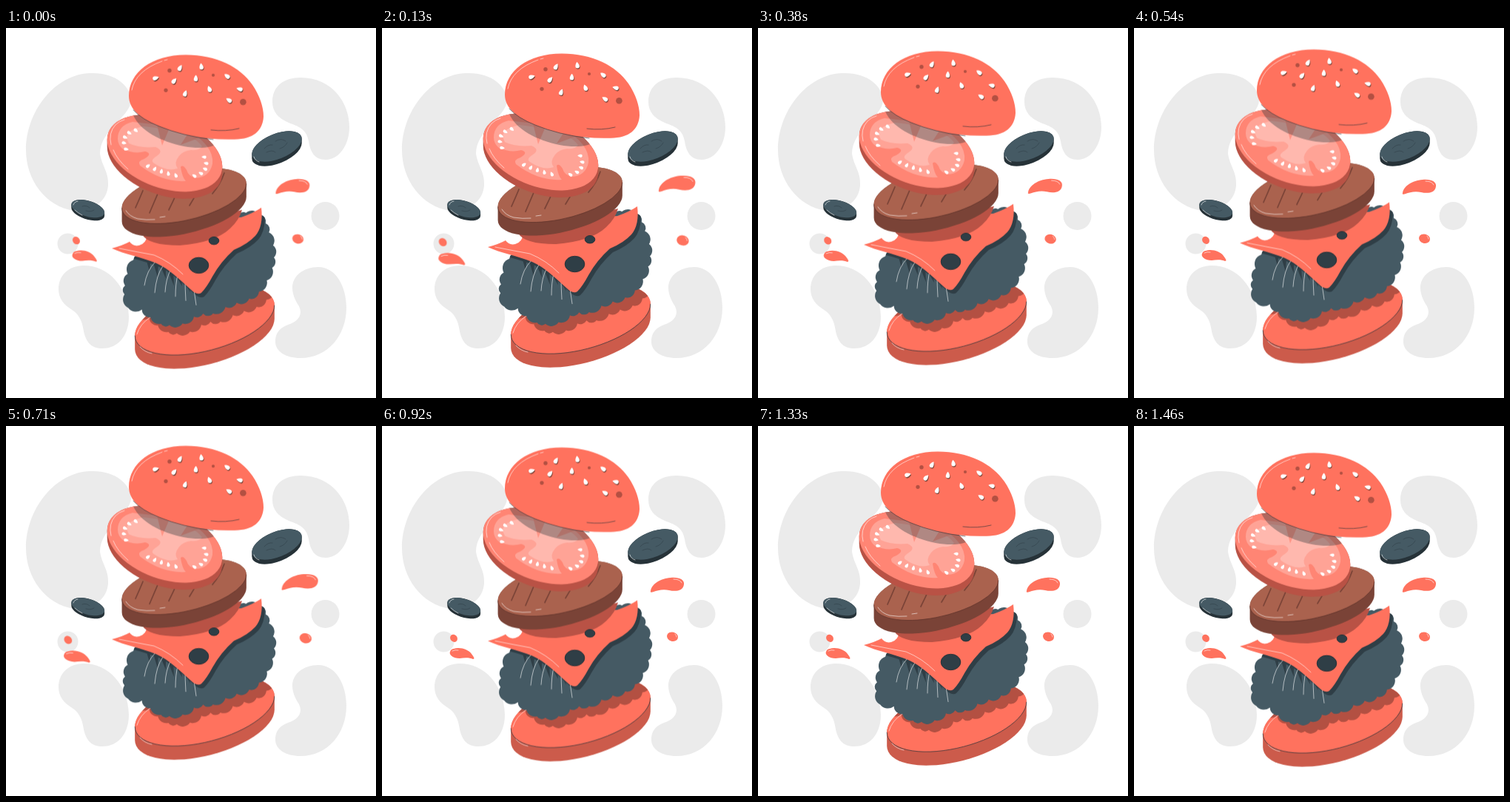
Recreate the animation shown at these times as an HTML page. Size 500 px wide and 500 px high, loop 1500 ms.

```html
<!DOCTYPE html>
<html lang="en">
<head>
<meta charset="utf-8">
<title>Floating burger</title>
<style>
  html, body { margin: 0; width: 100%; height: 100%; overflow: hidden; background: #fff; }
  svg { display: block; width: 100vw; height: 100vh; }
  #splash { transform-origin: 250px 260px; }
  .coral { fill: #ff725e; }
  .shine, .ink { fill: none; stroke: #fff; stroke-width: .6; stroke-linecap: round; }
  .ink { stroke: #263238; }
</style>
</head>
<body>
<svg viewBox="0 0 500 500">
  <defs>
    <clipPath id="leafClip"><path class="leaf"/></clipPath>
    <clipPath id="baseClip"></clipPath>
    <clipPath id="tomatoClip"></clipPath>
  </defs>

  <g fill="#ebebeb">
    <path d="M114 61C148 60 168 78 169 98C168 120 127 138 127 170C130 188 139 194 138 213C136 238 112 248 92 247C53 241 27 205 27 165C27 112 67 62 114 61Z"/>
    <path d="M398 67C440 67 464 100 464 134C464 158 450 178 432 178C416 178 411 166 409 153C406 136 395 133 382 128C368 122 360 113 360 100C360 78 376 67 398 67Z"/>
    <path d="M105 321C138 321 165 349 166 390C166 414 153 433 130 433C114 433 108 423 105 410C103 395 98 386 88 380C78 374 71 365 71 353C71 335 84 321 105 321Z"/>
    <path d="M422 323C446 323 460 350 460 378C460 415 435 446 398 446C378 446 364 437 364 424C364 408 375 403 384 400C396 395 401 387 396 376C390 367 387 359 387 351C387 335 402 323 422 323Z"/>
    <circle cx="431.5" cy="254" r="19"/>
    <circle cx="83.5" cy="291.5" r="14"/>
  </g>

  <g id="slices"></g>

  <g id="splash" class="coral">
    <path d="M363 223C364 214 376 206 390 205C402 204 409 208 408 214C407 223 397 224 388 222C380 220 372 222 367 224C364 225 362 225 363 223Z"/>
    <ellipse cx="392.5" cy="284.7" rx="7.6" ry="6.2" transform="rotate(15 392.5 284.7)"/>
    <path d="M97 301C105 298 117 302 121 308C124 312 126 315 123 315C119 313 112 313 105 314C96 314 90 309 92 305C93 302 95 301 97 301Z"/>
    <ellipse cx="97" cy="286.8" rx="5.4" ry="4.6" transform="rotate(50 97 286.8)"/>
    <path class="shine" d="M394 207Q403 207 405 212M95 304Q99 302 103 303M396 281Q398 283 398 285"/>
  </g>

  <g id="burger">
    <g id="base"></g>
    <g clip-path="url(#baseClip)"><path class="leaf" fill="#b35042" transform="translate(10 11)"/></g>
    <path class="shine" d="M177 414Q181 400 195 391M181 431Q187 438 197 440"/>

    <path class="leaf" fill="#455a64"/>
    <g clip-path="url(#leafClip)">
      <path class="cheese" fill="#2f3e46" transform="translate(4 5)"/>
      <path id="folds" fill="#2f3e46"/>
    </g>
    <path id="veins" class="shine"/>

    <path class="cheese coral"/>
    <path fill="#b95245" d="M184 279Q192 294 235 294Q283 290 303 271Q315 260 319 246Z"/>
    <g fill="#2f3e46" stroke="#263238">
      <ellipse cx="260.5" cy="321" rx="13.3" ry="10.7"/>
      <ellipse cx="281" cy="287.7" rx="6.8" ry="5.2"/>
    </g>
    <path class="shine" d="M153 298Q178 303 200 307Q222 316 239 333"/>

    <g id="patty"></g>
    <path fill="none" stroke="#7a4337" stroke-width="1.7" stroke-linecap="round" d="M185 220Q180 232 175 243M206 222Q200 236 194 250M230 225Q225 236 220 246M259 220Q254 231 248 240M295 196Q290 211 279 224"/>
    <path class="shine" d="M162 247Q167 255 178 258Q190 260 201 259M208 256L215 255"/>

    <g id="tomato"></g>
    <g clip-path="url(#tomatoClip)">
      <path fill="#ffa396" d="M151 150Q151 132 171 127L240 135Q282 158 279 184Q275 202 256 203Q246 200 244 192Q239 184 236 188Q238 202 243 207Q211 209 181 186Q177 180 187 177Q199 170 188 167Q174 171 158 164Q151 158 151 150Z"/>
      <path fill="#ffb8ae" d="M163 149Q164 137 186 133L232 139Q256 148 265 160Q262 166 250 165Q240 166 234 173Q226 183 232 190Q218 195 200 183Q194 179 204 173Q214 166 202 161Q180 163 166 156Z"/>
      <path fill="#ff8574" d="M203 127L211 159L222 133ZM249 138L236 158L263 148Z" opacity=".65"/>
      <g id="pips"></g>
      <path d="M168 104C172 135 203 152 240 160C262 164 276 162 290 156V130L170 100Z" fill="#263238" opacity=".36"/>
    </g>
    <path class="shine" d="M142 158Q138 142 148 131Q153 126 160 124M145 165Q150 178 165 191"/>

    <path class="coral" d="M166 92C166 60 197 36.4 243 36.4C284 36.4 317 53 333 77C343 92 348 107 348 120C347 139 334 150.5 309 150.7C270 152 236 145 207 133C182 123 166 110 166 92Z"/>
    <path class="ink" d="M172 111Q184 124 207 133Q238 146 280 151M277 138Q297 140.5 315 136"/>
    <path class="shine" d="M170 84Q175 58 211 45M214 44L218 43"/>
    <g fill="#b35042">
      <circle cx="221" cy="57.7" r="2.7"/>
      <circle cx="216" cy="84.3" r="2.6"/>
      <circle cx="280" cy="64" r="2.1"/>
      <circle cx="320.4" cy="100.3" r="4.3"/>
    </g>
    <g id="seeds"></g>
  </g>
</svg>
<script>
  const $ = id => document.getElementById(id);
  const add = (id, markup) => $(id).insertAdjacentHTML('beforeend', markup);
  const setPath = (query, d) => document.querySelectorAll(query).forEach(p => p.setAttribute('d', d));

  let state = 7;
  const random = () => (state = state * 16807 % 2147483647) / 2147483647;

  // Tilted disc: a side wall under an elliptical face.
  function disc(id, cx, cy, rx, ry, tilt, depth, face, side, line = 'none') {
    const a = tilt * Math.PI / 180, c = Math.cos(a), s = Math.sin(a);
    const ex = Math.hypot(rx * c, ry * s), ey = (rx * rx - ry * ry) * s * c / ex;
    const arc = `A${rx} ${ry} ${tilt} 0 1 `;
    const left = `${cx - ex} ${cy - ey}`, right = `${cx + ex} ${cy + ey}`;
    const top = `<ellipse cx="${cx}" cy="${cy}" rx="${rx}" ry="${ry}" transform="rotate(${tilt} ${cx} ${cy})" fill="${face}"/>`;
    add(id, `<path fill="${side}" d="M${left}${arc}${right}v${depth}${arc}${cx - ex} ${cy - ey + depth}Z"/>${top}
      <path d="M${right}${arc}${left}" fill="none" stroke="${line}" stroke-width=".7"/>`);
    if ($(id + 'Clip')) add(id + 'Clip', top);
  }

  // Replaces a smooth outline by bumps of random width.
  function ruffle(d, min, max) {
    const guide = document.createElementNS('http://www.w3.org/2000/svg', 'path');
    guide.setAttribute('d', d);
    const total = guide.getTotalLength();
    let out = d.match(/^M[^A-Z]+/)[0];
    for (let at = 0; at < total;) {
      const w = min + (max - min) * random();
      at = Math.min(at + w, total);
      const p = guide.getPointAtLength(at);
      out += `A${w * .65} ${w * .65} 0 0 1 ${p.x} ${p.y}`;
    }
    return out + 'Z';
  }

  // Teardrop seed pointing along the given angle.
  const seed = (x, y, turn, size, fill = '#fff') =>
    `<path fill="${fill}" transform="translate(${x} ${y}) rotate(${turn}) scale(${size})"
      d="M0-5.3C2-3 3.3-.5 3 2C2.5 5-2.5 5-3 2C-3.3-.5-2-3 0-5.3Z"/>`;

  disc('slices', 366, 160, 35.7, 17, -22, 6, '#455a64', '#263238');
  disc('slices', 110.7, 244.2, 23.2, 10.5, 17, 4, '#455a64', '#263238');
  add('slices', `<path class="ink" opacity=".6" d="M349 163Q354 157 360 158M352 168Q360 164 364 168M364 153Q372 148 378 153M370 163Q377 161 380 155M103 241Q109 239 113 243M108 247Q115 249 119 246"/>
    <path class="shine" d="M335 174Q336 179 342 181M91 239Q92 235 97 234M93 246Q97 250 103 253"/>`);

  disc('base', 268.5, 395.3, 97, 41, -15, 18.5, '#ff725e', '#cc5b4b', '#263238');
  disc('patty', 240.7, 227, 86, 33, -13, 18, '#aa624e', '#7a4337', '#5a3029');
  disc('tomato', 214.5, 169.3, 81, 47, 20, 9.5, '#ff8574', '#b95245');

  setPath('.leaf', ruffle('M314 254Q346 238 353 272Q373 310 349 347Q335 371 300 373Q288 391 259 385Q236 412 198 396Q191 382 181 380Q160 390 160 354Q164 325 176 307', 11, 21));
  setPath('.cheese', 'M143 298Q158 294 167 289Q172 296 180 294Q190 291 190 281L230 262L318 256Q335 250 345 243Q348 268 337 281Q327 292 308 300Q290 316 279 336Q271 351 264 358Q258 362 249 353C232 338 221 326 203 318C184 310 160 306 143 298Z');

  let folds = '', veins = '';
  for (let i = 0; i < 6; i++) {
    const x = 188 + i * 10, y = 308 + i * 6;
    folds += `M${x} ${y}h8l${-2 + i} ${16 + 8 * random()}Z`;
    veins += `M${x + 14} ${y + 8}q${3 * i - 12} 12 ${4 * i - 15} ${25 + 12 * random()}`;
  }
  setPath('#folds', folds);
  setPath('#veins', veins);

  // Three pockets of pips around the tomato.
  for (const first of [-23, 59, 157]) {
    for (let i = 0; i < 5; i++) {
      const a = (first + i * 13) * Math.PI / 180, r = .53 + .2 * Math.cos(a) ** 2;
      const u = 80 * r * Math.cos(a), v = 47 * r * Math.sin(a);
      const turn = Math.atan2(v, u) * 180 / Math.PI - 70;
      add('pips', seed(215 + u * .94 - v * .34, 169.3 + u * .34 + v * .94, turn, .68));
    }
  }

  // Sesame fans out from the middle of the bun.
  const sesame = [[202, 68], [227, 72], [235, 54.5], [264, 52.5], [256.5, 68.5],
    [299, 65.5], [316, 83], [275, 83], [242, 89], [301.5, 98]];
  for (const [x, y] of sesame) {
    const turn = (258 - x) * 1.3;
    add('seeds', seed(x + .7, y + 1.3, turn, .9, '#7a4337') + seed(x, y, turn, .9));
  }

  const LOOP = 1500, FPS = 24;
  const anims = [
    $('burger').animate([0, -10, 0].map(y => ({ transform: `translateY(${y}px)` })), LOOP),
    $('splash').animate([[0, 1], [.1, 1.1], [.3, 1], [.4, 1], [.5, 1.1], [.6, 1], [1, 1]]
      .map(([offset, k]) => ({ offset, transform: `scale(${k})` })), LOOP)
  ];
  anims.forEach(a => a.pause());

  const start = performance.now();
  function draw() {
    // Motion is stepped at 24 fps, each step showing its midpoint.
    const t = (performance.now() - start) % LOOP;
    const step = Math.floor((t + 4) * FPS / 1000) % (LOOP * FPS / 1000);
    anims.forEach(a => { a.currentTime = (step + .5) * 1000 / FPS; });
    requestAnimationFrame(draw);
  }
  draw();
</script>
</body>
</html>
```
